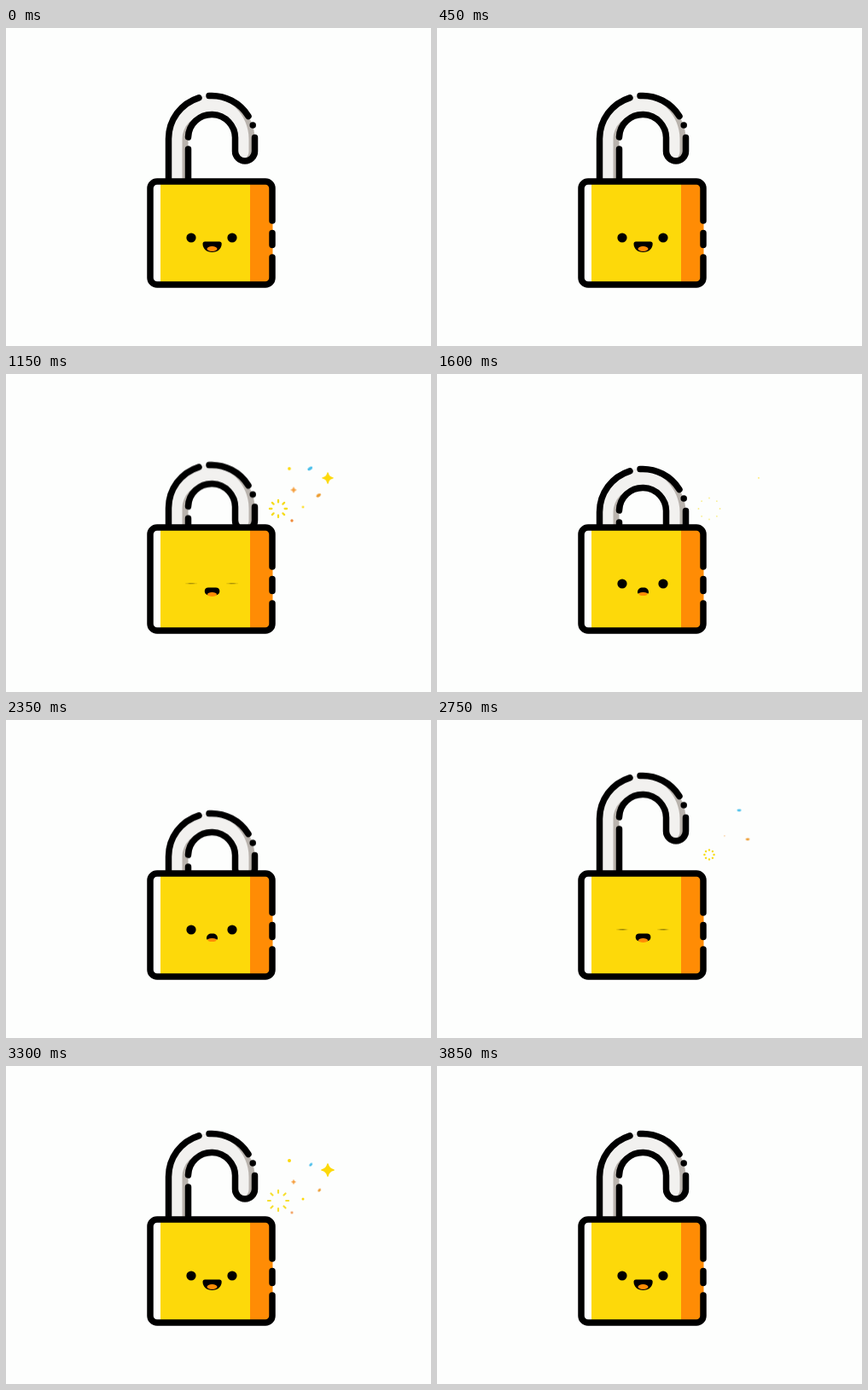
Write an HTML page that moves like this. It is 498 px wide and 373 px high and loops after 3900 ms.

```html
<!DOCTYPE html>
<html lang="en">
<head>
<meta charset="utf-8">
<title>Padlock</title>
<style>
  html, body { margin: 0; width: 100%; height: 100%; overflow: hidden; background: #fdfefd; }
  svg { display: block; width: 100vw; height: 100vh; }

  .line { fill: none; stroke: #000; stroke-width: 7.5; stroke-linecap: round; stroke-linejoin: round; }
  .yellow { fill: #fdd90a; }
  .orange { fill: #ff8c05; }
  .blue { fill: #45bdea; }

  .shackle, .body, .eye, .mouth, .tongue { animation: 3.9s linear infinite; }
  .shackle { animation-name: shackle; }
  .body { animation-name: squash; transform-origin: 241px 305px; }
  .eye { animation-name: blink; transform-box: fill-box; transform-origin: center; }
  .mouth { animation-name: mouth; }
  .tongue { animation-name: tongue; }

  /* The burst plays twice per loop: on closing and on opening. */
  .rays, .twinkle, .confetti { animation: 1.95s linear calc(var(--d, 0ms) - 1200ms) infinite; }
  .rays { animation-name: rays; fill: none; stroke: #f6dc1c; stroke-linecap: round; }
  .twinkle { animation-name: twinkle; }
  .confetti { animation-name: confetti; }

  @keyframes shackle {
    0%, 13.8% { transform: translateY(0); }
    15.4% { transform: translateY(5px); }
    16.7% { transform: translateY(18px); }
    17.9% { transform: translateY(34px); }
    20.5% { transform: translateY(28px); }
    23.1% { transform: translateY(26px); }
    28.2% { transform: translateY(27px); animation-timing-function: ease-in-out; }
    35.9%, 57.7% { transform: translateY(32px); }
    60.26% { transform: translateY(30.2px); }
    64.1% { transform: translateY(22px); }
    66.7% { transform: translateY(8px); }
    69.2% { transform: translateY(-8px); }
    70.5% { transform: translateY(-14px); animation-timing-function: ease-out; }
    73.1% { transform: translateY(-20px); animation-timing-function: ease-in-out; }
    78.2% { transform: translateY(2px); animation-timing-function: ease-in-out; }
    82% { transform: translateY(-.8px); }
    85%, 100% { transform: translateY(0); }
  }
  @keyframes squash {
    0%, 16.7% { transform: scale(1); }
    17.9% { transform: scale(1.06, .97); }
    20.4%, 74.4% { transform: scale(1); }
    78.2% { transform: scale(1.02, .99); }
    82%, 100% { transform: scale(1); }
  }
  @keyframes blink {
    0%, 26.9% { transform: scale(1); }
    29.5% { transform: scale(1.1, .06); }
    32%, 67.9% { transform: scale(1); }
    70.5% { transform: scale(1.1, .06); }
    73.1%, 100% { transform: scale(1); }
  }
  @keyframes mouth {
    0%, 26.9%, 73.1%, 100% {
      d: path("M230.5 253C230.5 251.5 231.5 250.5 233 250.5L250 250.5C251.5 250.5 252.7 251.5 252.7 253C252.7 259 248 263 241.5 263C235 263 230.5 259 230.5 253Z");
    }
    32%, 67.9% {
      d: path("M235 256C235 252.5 237.5 250.5 241 250.5L242 250.5C245.5 250.5 248 252.5 248 256C248 259 246 256.5 241.5 256.5C237 256.5 235 259 235 256Z");
    }
  }
  @keyframes tongue {
    0%, 26.9%, 73.1%, 100% { cy: 259px; rx: 6px; ry: 3px; }
    32%, 67.9% { cy: 258px; rx: 5px; ry: 2px; }
  }
  @keyframes rays {
    0% { stroke-dasharray: .1 40; stroke-dashoffset: -4.5; stroke-width: 0; opacity: 1; }
    2.56% { stroke-dasharray: .1 40; stroke-dashoffset: -5.5; stroke-width: 2.4; }
    28.2% { stroke-dasharray: 3.5 40; stroke-dashoffset: -8.5; stroke-width: 2.2; opacity: 1; }
    43.6% { stroke-dasharray: .1 40; stroke-dashoffset: -12.5; stroke-width: 1.8; opacity: .5; }
    46%, 100% { stroke-dasharray: .1 40; stroke-dashoffset: -13; stroke-width: 0; opacity: 0; }
  }
  @keyframes twinkle {
    0% { transform: scale(0); animation-timing-function: ease-out; }
    20%, 29% { transform: scale(1); }
    38%, 100% { transform: scale(0); }
  }
  @keyframes confetti {
    0% { transform: translate(-2px, 2px) scale(0); }
    2.56% { transform: translate(0, 0) scale(.8); }
    8% { transform: translate(1px, -2px) rotate(-15deg) scale(1); }
    28.2% { transform: translate(3px, var(--fall)) rotate(-45deg) scale(1); }
    40%, 100% { transform: translate(4px, calc(var(--fall) + 3px)) rotate(-70deg) scale(0); }
  }
</style>
</head>
<body>
<svg viewBox="0 0 498 373">
  <defs>
    <path id="band" d="M190.5 220V130a50.5 50.5 0 0 1 101 0V144.5a11.5 11.5 0 0 1-23 0V130a27.5 27.5 0 0 0-55 0V220Z"/>
    <clipPath id="bandClip"><use href="#band"/></clipPath>
    <clipPath id="bodyClip"><rect x="169" y="180" width="143.5" height="121" rx="8"/></clipPath>
    <clipPath id="aboveBody"><path d="M0 0H498V181H0Z"/></clipPath>
    <path id="star" d="M0-7Q1.2-1.2 7 0Q1.2 1.2 0 7Q-1.2 1.2-7 0Q-1.2-1.2 0-7Z" stroke-linejoin="round"/>
  </defs>

  <g clip-path="url(#aboveBody)">
    <g class="shackle">
      <use href="#band" fill="#b9b3ad"/>
      <g clip-path="url(#bandClip)"><use href="#band" x="-7" fill="#f2f1ef"/></g>
      <path class="line" d="M190.5 220V130A50.5 50.5 0 0 1 226 81.8M238 79.6A50.5 50.5 0 0 1 284 103.5
        M289.2 114h.01M291.5 128.5V144.5a11.5 11.5 0 0 1-23 0V130a27.5 27.5 0 0 0-55-2M213.5 142V220"/>
    </g>
  </g>

  <g class="body">
    <g clip-path="url(#bodyClip)">
      <path fill="#fff" d="M169 180H185V301H169Z"/>
      <path class="yellow" d="M181 180H287V301H181Z"/>
      <path class="orange" d="M286 180H313V301H286Z"/>
    </g>
    <path class="line" d="M312 226V188a8 8 0 0 0-8-8H177a8 8 0 0 0-8 8V293a8 8 0 0 0 8 8H304a8 8 0 0 0 8-8V269M312 240.5V254.5"/>
    <circle class="eye" cx="217" cy="246" r="5.6"/>
    <circle class="eye" cx="265" cy="246" r="5.6"/>
    <path class="mouth"/>
    <ellipse class="tongue orange" cx="241.5" cy="259" rx="6" ry="3"/>
  </g>

  <g transform="translate(319 158)">
    <path class="rays" d="M0 0H20M0 0H-20M0 0V20M0 0V-20M0 0L14 14M0 0L-14 14M0 0L14-14M0 0L-14-14"/>
  </g>
  <g transform="translate(377 122)">
    <g class="twinkle" style="--d:130ms"><use href="#star" class="yellow" stroke="#fdd90a" stroke-width="1.6"/></g>
  </g>
  <g transform="translate(337 136)">
    <g class="twinkle"><use href="#star" transform="scale(.45)" fill="#f59a35" stroke="#f59a35" stroke-width="1.5"/></g>
  </g>
  <g transform="translate(332 111)"><circle class="twinkle yellow" r="2" style="--d:100ms"/></g>
  <g transform="translate(348 156)"><circle class="twinkle yellow" r="1.5" style="--d:130ms"/></g>
  <g transform="translate(335 172)"><circle class="twinkle" r="1.7" fill="#f08a3c"/></g>
  <g transform="translate(354 106)"><ellipse class="confetti blue" rx="3.2" ry="1.8" style="--fall:9px"/></g>
  <g transform="translate(364 140)"><ellipse class="confetti" rx="2.9" ry="1.8" fill="#ec9a2c" style="--fall:5px"/></g>
</svg>
</body>
</html>
```
